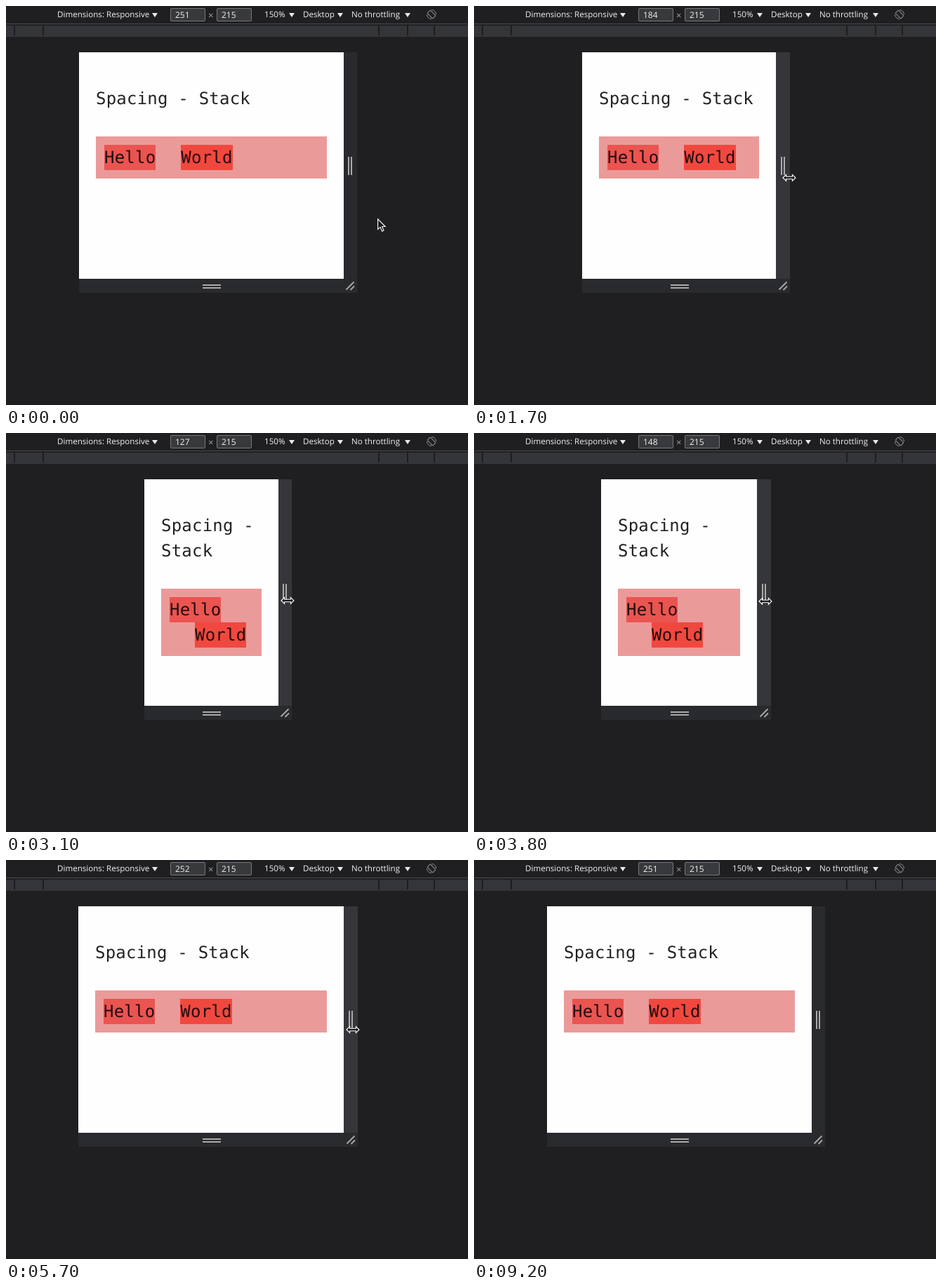
Animation, 658 px wide and 569 px high, one loop 9900 ms. Source, as an HTML page:

```html
<!DOCTYPE html>
<html lang="en">
<head>
<meta charset="utf-8">
<title>Responsive stack</title>
<style>
  html, body { margin: 0; width: 100%; height: 100%; overflow: hidden; background: #1f1f21; }
  #stage { position: relative; width: 658px; height: 569px; overflow: hidden; background: #1f1f21; text-rendering: geometricPrecision; }
  #stage > * { position: absolute; }

  .label, .field { font: 11.6px/18px "Open Sans", "Noto Sans", sans-serif; color: #f1f2f4; white-space: nowrap; top: 4px; }
  .menu::after { content: ""; position: absolute; left: var(--arrow); top: 5.5px; border: 4px solid transparent; border-top: 6px solid #e8e9ec; border-bottom: 0; }
  .field { top: 3px; width: 42px; height: 17px; padding-left: 6px; font-size: 12px; line-height: 18px; border: 1px solid #77787b; border-radius: 2px; background: #38393c; }
  .rule { left: 0; top: 25px; width: 658px; height: 1px; background: #494b4f; }
  .ruler { left: 0; top: 28px; width: 658px; height: 16px; background: #343539; }
  .ruler i { position: absolute; top: 0; width: 2px; height: 14px; background: #1d1d1f; }

  .page { left: var(--left); top: 66px; width: calc(var(--right) - var(--left)); height: 323px; background: #fffefe; overflow: hidden; font: 24px/36px "DejaVu Sans Mono", monospace; letter-spacing: .22px; color: #212224; }
  .inner { width: calc(var(--w) * 1.5px - 48px); margin: 48px 24px 0; }
  .inner p { margin: 0 0 36px; }
  .stack { display: flex; flex-wrap: wrap; padding: 12px; background: #eb9a9a; color: #210c0c; }
  .stack span { background: #ea5451; }
  .stack span + span { margin-left: 36px; background: #f0483f; }

  .side { left: var(--right); top: 66px; width: calc(var(--edge) - var(--right)); height: 323px; background: #292a2d; }
  .drag .side { background: #35363a; }
  .base { left: var(--left); top: 389px; width: calc(var(--edge) - var(--left)); height: 20px; background: #292a2d; }
  .grip { border: solid #aba9aa; box-sizing: border-box; }
  .grip.v { left: calc(var(--edge) - 13px); top: 215px; width: 6px; height: 26px; border-width: 0 2px; }
  .grip.h { left: 280px; top: 397px; width: 26px; height: 6px; border-width: 2px 0; }
  .corner { left: calc(var(--edge) - 17px); top: 392px; }
  svg { overflow: visible; fill: none; }
  #cursor { left: 0; top: 0; fill: #17181a; stroke: #fff; stroke-width: 1.1; }
</style>
</head>
<body>
<div id="stage">
  <div class="label menu" style="left:73px;--arrow:135px">Dimensions: Responsive</div>
  <div class="field" id="width" style="left:234px">251</div>
  <div class="label" style="left:288px;color:#a0a3a7;font-size:13px">×</div>
  <div class="field" style="left:300px">215</div>
  <div class="label menu" style="left:368px;--arrow:35px">150%</div>
  <div class="label menu" style="left:423px;--arrow:49px">Desktop</div>
  <div class="label menu" style="left:492px;--arrow:76px">No throttling</div>
  <svg style="left:598px;top:4px" width="16" height="16" stroke="#909296">
    <rect x="5" y="2.5" width="6" height="11" rx="1" transform="rotate(-45 8 8)"/>
    <path d="M8 1.5A6.5 6.5 0 0 1 14.5 8M8 14.5A6.5 6.5 0 0 1 1.5 8"/>
  </svg>
  <div class="rule"></div>
  <div class="ruler"><i style="left:11px"></i><i style="left:52px"></i><i style="left:530px"></i><i style="left:571px"></i><i style="left:609px"></i></div>

  <div class="page"><div class="inner">
    <p>Spacing - Stack</p>
    <div class="stack"><span>Hello</span><span>World</span></div>
  </div></div>
  <div class="side"></div>
  <div class="base"></div>
  <div class="grip v"></div>
  <div class="grip h"></div>
  <svg class="corner" width="14" height="14" stroke="#aba9aa" stroke-width="1.8"><path d="M1.5 12.5L12.5 1.5M7.5 13L13 7.5"/></svg>
  <svg id="cursor" width="1" height="1">
    <path id="arrow" d="M.6.8V15.6L4 12.4L6.6 18.2L9 17.1L6.5 11.5H11.2Z"/>
    <path id="resize" d="M-9 0L-4.4-4.4V-1.7H4.4V-4.4L9 0L4.4 4.4V1.7H-4.4V4.4Z"/>
  </svg>
</div>
<script>
const LOOP = 9.9, FPS = 10;
const FULL = 251, CENTER = 292.5, ZOOM = 1.5;
const GRAB = 1.3, RELEASE = 8.3, LAG = .04;

const linear = f => f;
const smooth = f => f * f * (3 - 2 * f);
const out = f => 1 - (1 - f) ** 2;

// Each drag: from, to (seconds), viewport width and pointer height at its end.
const drags = [
  [1.2, 2.0, 153, 242, smooth],
  [2.1, 2.5, 141, 239, linear],
  [2.7, 3.2, 126, 239, out],
  [3.5, 4.5, 200, 243, linear],
  [4.5, 5.5, 246, 243, out],
  [5.5, 6.1, 256, 241, out],
  [6.2, 6.4, 252, 241, linear],
  [6.7, 7.0, 250, 242, linear],
  [8.1, 8.2, FULL, 242, linear]
];

const byId = id => document.getElementById(id);
const stage = byId("stage"), field = byId("width"), cursor = byId("cursor");
const arrow = byId("arrow"), resize = byId("resize");

const progress = (t, a, b) => Math.min(1, Math.max(0, (t - a) / (b - a)));
const mix = (a, b, f) => a + (b - a) * f;
const rightEdge = w => CENTER + w * ZOOM / 2;
const snap = x => Math.ceil(x - .5) + "px";
const show = (el, on) => { el.style.display = on ? "" : "none"; };

function dragAt(t) {
  let w = FULL, y = 249;
  for (const [from, to, width, height, ease] of drags) {
    const f = ease(progress(t, from, to));
    w = mix(w, width, f);
    y = mix(y, height, f);
  }
  return { w, y };
}

function pointerAt(t) {
  if (t < .8) {
    const near = progress(t, .2, .4), reach = progress(t, .5, .8);
    return [mix(mix(529, 518, near), 495, reach), mix(mix(303, 284, near), 250, reach)];
  }
  if (t >= RELEASE) {
    const leave = progress(t, 8.7, 9.1);
    return [mix(492, 165, leave), mix(234, 11, leave)];
  }
  // The pointer trails the edge it drags.
  const { w, y } = dragAt(t - LAG);
  return [rightEdge(w) + 13.5, y];
}

function draw(t) {
  const w = Math.round(dragAt(t).w), right = rightEdge(w);
  const [x, y] = pointerAt(t).map(Math.round);
  const set = (name, value) => stage.style.setProperty(name, value);
  set("--w", w);
  set("--left", snap(2 * CENTER - right));
  set("--right", snap(right));
  set("--edge", Math.round(right + 19.5) + "px");
  stage.classList.toggle("drag", t >= GRAB && t < RELEASE);
  field.textContent = w;
  const sizing = t >= .8 && t < RELEASE;
  show(arrow, !sizing);
  show(resize, sizing);
  show(cursor, t < 9.2);
  cursor.style.transform = `translate(${x}px, ${y}px)`;
}

const start = performance.now();
let last = -1;
function tick() {
  const step = Math.floor((performance.now() - start) / 1000 % LOOP * FPS);
  if (step !== last) draw((last = step) / FPS);
  requestAnimationFrame(tick);
}
tick();
</script>
</body>
</html>
```
